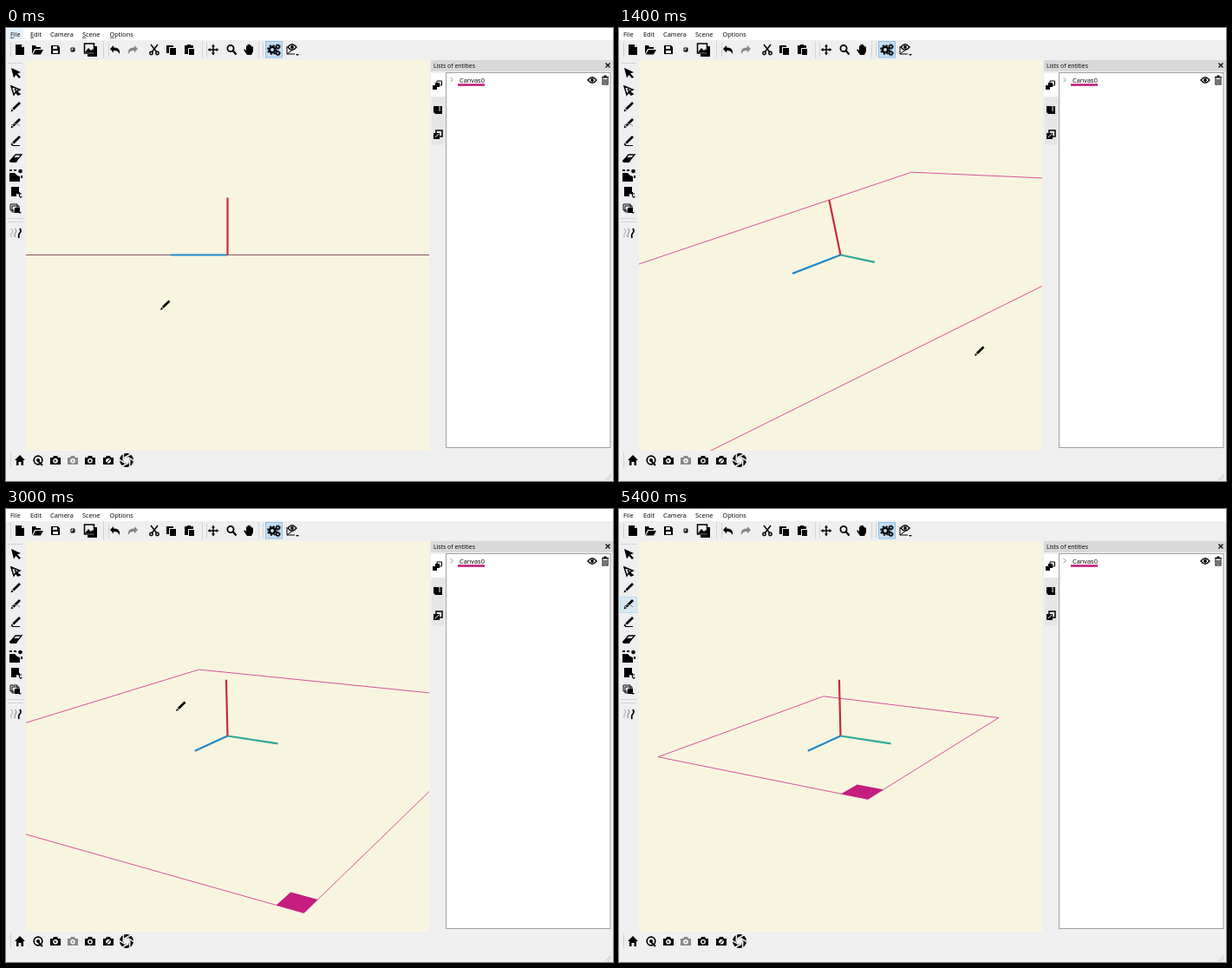
These frames come from a looping animation (700 by 522 pixels, 5.44 s). An HTML page:

```html
<!DOCTYPE html>
<html lang="en">
<head>
<meta charset="utf-8">
<title>Rotating and zooming a 3D canvas</title>
<style>
  html, body { margin: 0; width: 100%; height: 100%; overflow: hidden; background: #efefef; }
  svg { display: block; }
  text { font: 7.4px "Open Sans", "Noto Sans", sans-serif; fill: #000; }
  .line { fill: none; stroke: #000; stroke-width: 1.5; }
  .grey { fill: #888; }
  .grip { fill: none; stroke: #aaa; stroke-dasharray: 1 1.4; }
</style>
</head>
<body>
<svg id="stage" width="700" height="522" viewBox="0 0 700 522">
  <rect width="700" height="522" fill="#efefef"/>

  <!-- menu bar -->
  <rect width="700" height="14" fill="#fff"/>
  <rect id="fileHot" y="1" width="20" height="12" fill="#e5f1fb"/>
  <text x="5" y="9.8">File</text><text x="28" y="9.8">Edit</text><text x="51" y="9.8">Camera</text>
  <text x="88" y="9.8">Scene</text><text x="119.5" y="9.8">Options</text>
  <path id="mnemonics" class="line" style="stroke-width:.7" d="M5 11.3h4M28 11.3h4M88 11.3h4M120 11.3h5"/>

  <!-- toolbars -->
  <path class="grip" d="M5.5 17v17M118.5 17v17M231.5 17v17M296.5 17v17M5.5 490v17M3 40.5h17M3 223.5h17"/>
  <path d="M112.5 15v20M226.5 15v20M291.5 15v20M1 219.5h20" stroke="#d5d5d5"/>
  <rect x="299.5" y="15.5" width="19" height="18.5" fill="#c5dff3" stroke="#8fc0e6"/>
  <rect id="toolHot" x="1.5" y="101.5" width="19" height="18" fill="#d8e8f2" stroke="#c4dcec"/>

  <!-- viewport -->
  <svg x="23" y="37" width="465" height="450" viewBox="23 37 465 450">
    <rect x="23" y="37" width="465" height="450" fill="#f8f5df"/>
    <path id="sheet" fill="none" stroke-width=".85"/>
    <path id="handle" fill="#c51d80"/>
    <g fill="none" stroke-width="2.2">
      <path id="axisT" stroke="#2fa897"/>
      <path id="axisB" stroke="#2389c9"/>
      <path id="axisR" stroke="#c92a3a"/>
    </g>
  </svg>

  <!-- entity panel -->
  <rect x="490" y="37" width="210" height="13" fill="#d9d9d9"/>
  <text x="493" y="46" style="font-size:6.9px">Lists of entities</text>
  <path class="line" d="M691.5 40.5l5 5m0-5l-5 5" style="stroke-width:1.2"/>
  <path d="M491 79.5h15v27h-15zM491 106.5h15v28h-15z" fill="#e6e6e6"/>
  <rect x="490" y="52" width="17" height="27" fill="#fff"/>
  <rect x="507.5" y="51.5" width="189.5" height="432" fill="#fff" stroke="#a0a0a0"/>
  <path class="line" d="M512.5 57l2.7 2.7l-2.7 2.7" style="stroke:#888;stroke-width:.9"/>
  <text x="523" y="62.5">Canvas0</text>
  <rect x="521" y="64.2" width="31" height="2.6" fill="#c51d80"/>

  <g id="icons"></g>
  <path d="M691 521l7-7M694 521l4-4" stroke="#c0c0c0"/>
  <g id="cursor"></g>
</svg>
<script>
const $ = id => document.getElementById(id);
const fill = (d, cls = '') => `<path class="${cls}" d="${d}"/>`;
const line = (d, style = '') => `<path class="line" d="${d}" style="${style}"/>`;
const pencil = fill('M0 0L1.1-3.2L3.1-1.2Z') + line('M2.8-3L10.5-10.5', 'stroke-width:2.7');
const pen = `<g transform="translate(-5.5 5.5)">${pencil}</g>`;
const caret = fill('M3 4h4l-2 2z');
const thin = 'stroke-width:1';
const page = fill('M-5-6H2L5-3V6H-5Z');
const pointer = 'M-5-6L6-1L2 .5L6 4.5L4 6L.5 2L-2 5.5Z';
const cam = inner => '<path fill-rule="evenodd" d="M-6-3H-3L-2-5H2L3-3H6V5H-6ZM0-2.2A3 3 0 1 0 .01-2.2Z"/>' + inner;
const eye = line('M-5 0Q0-6.5 5 0Q0 6.5-5 0Z', 'stroke-width:1.3') + '<circle r="1.9"/>';
const undo = 'M-6-1L-2-5V-2.5C3-3 6 0 5 5C3 1 1 .8-2 1V3.5Z';
const gear = (x, y, r) => `<circle class="line" cx="${x}" cy="${y}" r="${r}" style="stroke-width:${r * .8}"/>` +
  `<circle class="line" cx="${x}" cy="${y}" r="${r * 1.6}" stroke-dasharray="${r * .63}" style="stroke-width:${r * .5}"/>`;
const aperture = '<circle class="line" r="5.7" style="stroke-width:4.6"/>' +
  [0, 60, 120, 180, 240, 300].map(a => `<path d="M-2.5-3L6-7.5" stroke="#efefef" stroke-width="1.5" transform="rotate(${a})"/>`).join('');

const icons = [
  // top row
  [16, 25, page + '<path d="M2-6V-3H5" fill="#efefef"/>'],
  [36, 25, fill('M-6 5V-5H-2L-1-3H4V-1H-3Z') + fill('M-5 5.5L-2 0H7L4 5.5Z')],
  [57, 25, fill('M-5-5H3L5-3V5H-5Z') + '<path d="M-3-4H2V-1H-3ZM-3 1H3V4H-3Z" fill="#efefef"/>'],
  [77, 25, line('M-2-2H2V2H-2Z', thin) + fill('M-2 2L2-2V2Z')],
  [97, 25, line('M-6.5-7H4.5V4H-6.5Z') + fill('M-6 3L-2-2L1 1L3-1L5 3ZM-3 5H5V-4H8V8H-3Z')],
  [126, 25, fill(undo)],
  [146, 25, `<g transform="scale(-1 1)">${fill(undo, 'grey')}</g>`],
  [171, 25, line('M-4-6L3 3M4-6L-3 3') + '<circle class="line" cx="-3.5" cy="4" r="1.7"/><circle class="line" cx="3.5" cy="4" r="1.7"/>'],
  [191, 25, fill('M-6-5H2V-3H-3V4H-6ZM-2-2H5V6H-2Z')],
  [211, 25, fill('M-5-5H-2V-6H2V-5H5V-2H-1V5H-5ZM0-1H6V6H0Z')],
  [239, 25, line('M-5 0H5M0-5V5') + fill('M-6.5 0l3-2v4zM6.5 0l-3-2v4zM0-6.5l-2 3h4zM0 6.5l-2-3h4z')],
  [260, 25, '<circle class="line" cx="-1" cy="-1.5" r="3.6" style="stroke-width:1.8"/>' + line('M2 1.5L5.5 5.5', 'stroke-width:2.3')],
  [280, 25, fill('M-2 6L-6 0L-4.5-.5L-3 1V-4.5H-1.5V-6H0V-6.3H1.5V-5H3V-3.5H5V2L3 6Z')],
  [309, 25, gear(-2, 0, 3.2) + gear(4.5, -3.5, 1.8) + gear(4.5, 4, 1.8)],
  [330, 24, `<g transform="translate(0 -2)">${eye}</g>` + line('M-6-3V6H3M-6 6L2 0', thin) + fill('M4 6h4l-2 2z')],
  // tool column
  [11, 52, fill(pointer)],
  [11, 72, line('M-5-5L5-1L1 1L5 4L3 5L0 2L-2 5Z', 'stroke-width:1.5') + line('M-1-2L3 4')],
  [11, 91, pen],
  [11, 110, pen + line('M-5 2Q0-2 5 3', 'stroke:#888;stroke-width:1')],
  [11, 130, pen + line('M-4 5.5H5', thin)],
  [11, 150, line('M-6 3L0-4H7L1 3Z', 'stroke-width:1.3') + fill('M-7 3L-3-1H4L1 5H-6Z')],
  [11, 170, fill('M-7-3H-1L2 0L5 1V7H-7ZM-7-7h3v2h-3zM-2-7h3v2h-3zM6 0h2v3h-2z') + '<circle cx="5.5" cy="-5" r="2.3"/>'],
  [11, 189, fill('M-5-6H4V2H1V5H-5Z') + line('M2 2H7M4.5 0V5', thin) + fill('M4 5h4l-2 2z')],
  [11, 208, line('M-6-5H2V2H-6ZM-4-3H4V4H-4Z', thin) + fill('M-1-1H5V5H-1Z') + caret],
  [11, 236, line('M-5-5Q-2-2-4 0T-5 5', 'stroke:#999;stroke-width:.8') + line('M-.5-5Q2-2 0 0T-.5 5', 'stroke:#777;stroke-width:1') + line('M5-5Q7-2 5 0T4 6', 'stroke-width:1.7')],
  // panel tabs and row buttons
  [498, 66, line('M-1-5H4.5V0H-1Z', thin) + fill('M-6 0H-1V5H-6ZM-3-3H2V2H-3Z')],
  [498, 94, fill('M-5-4H5V5H-3L-5 3Z') + '<path d="M2-4V2" stroke="#efefef"/>'],
  [498, 123, line('M-2-5H5V2H-2Z') + fill('M-5-2H2V5H-5Z') + '<path d="M-3 3L1-1" stroke="#efefef"/>'],
  [676, 60, eye],
  [691, 60, fill('M-4-4H-1.5V-5.5H1.5V-4H4V-2.5H-4Z') + line('M-3-2V5H3V-2M-1-1V4M1-1V4', 'stroke-width:1.1')],
  // bottom row
  [16, 498, fill('M-6 0L0-6L6 0H4V6H1.5V2H-1.5V6H-4V0Z')],
  [37, 498, '<circle class="line" r="4.8" style="stroke-width:1.7"/><circle r="2"/>' + line('M0 1L5 6', 'stroke-width:2')],
  [57, 498, cam(fill('M-1.5-1L1.5 1L-1 2Z'))],
  [77, 498, `<g fill="#888">${cam('<circle cy=".8" r="1"/>')}</g>`],
  [97, 498, cam('<circle cy=".8" r="1.5"/>')],
  [118, 498, cam(line('M-2 3L3-2', thin))],
  [139, 498, aperture],
];
$('icons').innerHTML = icons.map(([x, y, art]) => `<g transform="translate(${x} ${y})">${art}</g>`).join('');
$('cursor').innerHTML = pencil;

// Monotone cubic interpolation over rows of [time, ...values].
function track(rows, t) {
  const last = rows.length - 1;
  if (t <= rows[0][0]) return rows[0].slice(1);
  if (t >= rows[last][0]) return rows[last].slice(1);
  const i = rows.findIndex(row => row[0] > t) - 1;
  const slope = (n, c) => n < 0 || n >= last ? 0 : (rows[n + 1][c] - rows[n][c]) / (rows[n + 1][0] - rows[n][0]);
  const tangent = (n, c) => {
    const a = slope(n - 1, c), b = slope(n, c);
    return a * b > 0 ? 2 * a * b / (a + b) : 0;
  };
  const span = rows[i + 1][0] - rows[i][0], u = (t - rows[i][0]) / span;
  return rows[i].slice(1).map((p, k) => {
    const c = k + 1, q = rows[i + 1][c];
    return p + (q - p) * u * u * (3 - 2 * u) +
      span * u * (1 - u) * (tangent(i, c) * (1 - u) - tangent(i + 1, c) * u);
  });
}

const LOOP = 5440, FOCAL = 856, CENTER = [255.5, 261.5];
const AXIS = 66 / FOCAL, HALF_B = .1865, HALF_T = .152, HANDLE = .0426;
// yaw, pitch, roll in degrees
const view = [[80, 90, 0, 0], [720, 83.7, 2.5, 3.2], [1400, 58.5, 15.7, 11.7], [2080, 32.8, 16.1, 1.4]];
// wheel notches
const zoom = [[2840, 8], [3200, 6], [3320, 6], [3520, 4], [3680, 4], [3920, 1], [4040, 1], [4200, 0]];
const pointerPath = [[80, 178, 325], [720, 244, 350], [1400, 410, 378], [2040, 460, 345], [2480, 199.5, 231],
  [2640, 196, 233], [3320, 196, 233], [3520, 194, 234], [3680, 194, 234], [3920, 192, 232], [4360, 192, 232],
  [4480, 198, 229], [4640, 163, 240], [4800, 163, 240], [5360, 10, 114]];

// Camera orbiting the origin; lengths are fractions of its distance.
function makeProjector(t) {
  const [yaw, pitch, roll] = track(view, t).map(a => a * Math.PI / 180);
  const { sin, cos } = Math;
  return (b, s, r = 0) => {
    const depth = s * sin(yaw) + b * cos(yaw);
    const x = s * cos(yaw) - b * sin(yaw);
    const y = depth * sin(pitch) - r * cos(pitch);
    const z = depth * cos(pitch) + r * sin(pitch);
    const k = FOCAL / (1 - z);
    return { z, at: [CENTER[0] + k * (x * cos(roll) + y * sin(roll)), CENTER[1] + k * (y * cos(roll) - x * sin(roll))] };
  };
}

const path = points => 'M' + points.map(p => p.at.map(v => v.toFixed(2)).join(' ')).join('L');

function draw(now) {
  const t = Math.floor(now % LOOP / 40) * 40;
  const project = makeProjector(t);
  const scale = 1.1 ** track(zoom, t)[0];
  const hb = HALF_B * scale, ht = HALF_T * scale;
  const corner = project(hb, ht), side = HANDLE * (1 - corner.z);
  const idle = t < 120;

  $('sheet').setAttribute('d', path([project(hb, -ht), project(-hb, -ht), project(-hb, ht), corner]) + 'Z');
  $('sheet').setAttribute('stroke', idle ? '#85505f' : '#d0358d');
  $('handle').setAttribute('d', path([corner, project(hb - side, ht), project(hb - side, ht - side), project(hb, ht - side)]) + 'Z');
  const origin = project(0, 0);
  $('axisB').setAttribute('d', path([origin, project(AXIS, 0)]));
  $('axisT').setAttribute('d', path([origin, project(0, AXIS)]));
  $('axisR').setAttribute('d', path([origin, project(0, 0, AXIS)]));

  const [x, y] = track(pointerPath, t);
  $('cursor').setAttribute('transform', `translate(${x} ${y})`);
  $('cursor').style.display = x < 23 ? 'none' : '';
  $('fileHot').style.display = $('mnemonics').style.display = idle ? '' : 'none';
  $('toolHot').style.display = t >= 5360 ? '' : 'none';
}

const start = performance.now();
function tick() {
  draw(performance.now() - start);
  requestAnimationFrame(tick);
}
tick();
</script>
</body>
</html>
```
